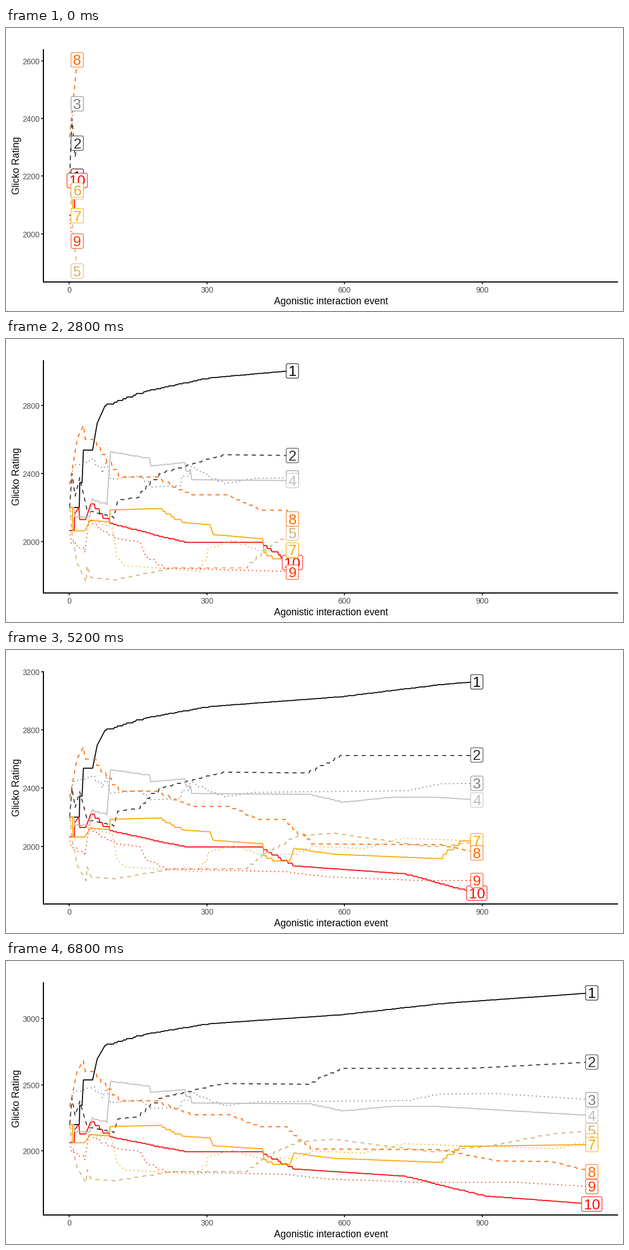
Write a matplotlib script that moves like this. It is 1105x507 px and loops after 7 s.

```python
import math
from itertools import pairwise

import matplotlib.pyplot as plt
import numpy as np
from matplotlib.animation import FuncAnimation
from matplotlib.patches import FancyBboxPatch

W, H, DPI = 1105, 507, 64
PT = 72 / DPI  # points per pixel
FRAMES, INTERVAL = 35, 200

LEFT, RIGHT, TOP, BOTTOM = 67, 1096, 38.2, 454.3
X0, X_SCALE = 113.2, 0.8217
START, STEP, LAST = 17.4, 33.5, 1139
EM = 26
STYLES = {"solid": "-", "dash": (0, (4, 4)), "dot": (0, (1, 3))}

plt.rcParams["font.family"] = "Liberation Sans"
rng = np.random.default_rng(4)
fig = plt.figure(figsize=(W / DPI, H / DPI), dpi=DPI, facecolor="white")
ax = fig.add_axes([0, 0, 1, 1])
ax.set_xlim(0, W)
ax.set_ylim(H, 0)
ax.axis("off")


def px(x):
    return X0 + X_SCALE * x


def stroke(xs, ys, color, width=2.0, **kw):
    return ax.plot(xs, ys, color=color, lw=width * PT, solid_capstyle="butt",
                   dash_capstyle="butt", **kw)[0]


def write(x, y, s, size, color="black", **kw):
    kw = {"ha": "center", "va": "baseline", **kw}
    return ax.text(x, y, s, fontsize=size * PT, color=color, **kw)


def stairs(knots, tread=10, rise=2.5):
    """Join the knots by uneven steps, since a rating only moves when a bout ends."""
    path = [knots[0]]
    for (x0, y0), (x1, y1) in pairwise(knots):
        n = max(1, int((x1 - x0) / tread))
        for i in range(1, n + 1):
            late = rng.uniform(0, 0.6) if i < n else 0
            x = x0 + (x1 - x0) * (i - late) / n
            if n > 1:
                path.append((x - rise, path[-1][1]))
            path.append((x, y0 + (y1 - y0) * i / n))
    return np.array(path, float).T


class Track:
    """One rated individual: a line growing to the right and a boxed label."""

    all = []

    def __init__(self, name, color, style, *knots):
        n = len(Track.all)
        self.x, self.y = stairs(knots)
        self.line = stroke([], [], color, 1.8, ls=STYLES[style], zorder=3 + 0.01 * n)
        self.w, self.h = 7.6 + 0.556 * EM * len(name), 26
        self.box = FancyBboxPatch((0, 0), self.w, self.h, fc="white", ec=color, lw=PT,
                                  boxstyle="round,pad=0,rounding_size=2.8",
                                  zorder=10 + 2 * n)
        ax.add_patch(self.box)
        self.text = write(0, 0, name, EM, color, zorder=11 + 2 * n)
        Track.all.append(self)

    def until(self, tip):
        keep = self.x < tip
        return (np.append(self.x[keep], tip),
                np.append(self.y[keep], np.interp(tip, self.x, self.y)))

    def draw(self, xs, ys):
        self.line.set_data(xs, ys)
        x, y = xs[-1], ys[-1]
        self.box.set_bounds(x - self.w / 2, y - self.h / 2, self.w, self.h)
        self.text.set_position((x, y + 9.3))


# Key (event, rating) points of each individual, in drawing order.
Track("1", "#000000", "solid", (1, 2200), (22, 2200), (23, 2345), (28, 2345), (31, 2537),
      (51, 2537), (61, 2695), (78, 2797), (163, 2880), (305, 2961), (593, 3029),
      (820, 3116), (1139, 3194))
Track("10", "#FF0000", "solid", (1, 2065), (11, 2065), (12, 2163), (21, 2200), (23, 2129),
      (36, 2129), (47, 2221), (89, 2107), (252, 1995), (416, 1995), (488, 1865),
      (732, 1810), (905, 1661), (1139, 1600))
Track("2", "#333333", "dash", (1, 2200), (6, 2400), (13, 2267), (23, 2375), (39, 2185),
      (97, 2138), (106, 2242), (150, 2260), (196, 2398), (335, 2510), (520, 2504),
      (590, 2624), (873, 2624), (1139, 2672))
Track("3", "#7F7F7F", "dot", (1, 2200), (8, 2440), (50, 2485), (72, 2402), (81, 2472),
      (90, 2365), (155, 2385), (175, 2320), (240, 2328), (264, 2440), (337, 2340),
      (404, 2371), (740, 2382), (806, 2430), (925, 2434), (1139, 2388))
Track("4", "#BEBEBE", "solid", (1, 2200), (10, 2200), (12, 2145), (45, 2145), (50, 2250),
      (82, 2215), (90, 2527), (175, 2488), (178, 2443), (246, 2464), (267, 2363),
      (526, 2357), (593, 2302), (702, 2337), (800, 2337), (1139, 2268))
Track("5", "#D2B071", "dash", (1, 2200), (6, 2050), (17.4, 1871), (37, 1762), (39, 1858),
      (48, 1788), (98, 1775), (228, 1845), (386, 1845), (420, 1940), (495, 2068),
      (574, 2090), (790, 1994), (920, 2040), (1049, 2129), (1139, 2154))
Track("6", "#E8AA2E", "dot", (1, 2200), (7, 2115), (17, 2152), (94, 2080), (104, 1912),
      (121, 1858), (282, 1825), (302, 1955), (353, 2005), (410, 1947), (495, 1945),
      (526, 2000), (641, 1985), (727, 2055), (1055, 2018), (1139, 2076))
Track("7", "#FFA500", "solid", (1, 2200), (7, 2200), (8, 2063), (34, 2063), (46, 2125),
      (88, 2113), (89, 2185), (195, 2194), (246, 2113), (307, 2098), (314, 2040),
      (422, 2016), (424, 1935), (444, 1898), (481, 1898), (490, 1985), (574, 1945),
      (809, 1914), (851, 2035), (1139, 2049))
Track("8", "#FF6A00", "dash", (1, 2335), (17.4, 2603.5), (31, 2682), (35, 2600), (53, 2600),
      (108, 2379), (190, 2379), (264, 2274), (350, 2274), (412, 2184), (471, 2184),
      (526, 2016), (808, 2010), (933, 1925), (1049, 1921), (1139, 1845))
Track("9", "#FF3300", "dot", (1, 2065), (5, 1990), (34, 1935), (43, 2125), (100, 2018),
      (155, 1995), (167, 1912), (207, 1845), (471, 1824), (556, 1790), (763, 1764),
      (970, 1764), (1139, 1732))


def breaks(lo, hi, m=5):
    """Axis breaks by the extended Wilkinson rule, kept inside the range."""
    best, ticks, span = -9, [], hi - lo
    for i, q in enumerate((1, 5, 2, 2.5, 4, 3)):
        for step in (10 * q, 100 * q, 1000 * q):
            for k in range(2, 11):
                for a in range(math.floor(hi / step) - k + 1, math.ceil(lo / step) + 1):
                    first, last = a * step, (a + k - 1) * step
                    cover = 1 - 0.5 * ((hi - last) ** 2 + (lo - first) ** 2) / (0.1 * span) ** 2
                    ratio = (k - 1) / (last - first) * (max(last, hi) - min(first, lo)) / (m - 1)
                    dense = 2 - max(ratio, 1 / ratio)
                    score = 0.25 * (1 - i / 5) + 0.2 * cover + 0.5 * dense + 0.05
                    if score > best:
                        best, ticks = score, first + step * np.arange(k)
    return [t for t in ticks if lo <= t <= hi]


stroke([LEFT, LEFT], [38, 456], "black", zorder=2)
stroke([LEFT - 1, RIGHT], [455, 455], "black", zorder=2)
for v in range(0, 901, 300):
    stroke([round(px(v))] * 2, [455, 459], "#333333", zorder=1)
    write(px(v), 473.5, str(v), 13.9, "#4D4D4D")
write(582, 495, "Agonistic interaction event", 17.5)
write(24, 246, "Glicko Rating", 17.5, rotation=90, rotation_mode="anchor")

y_ticks = [(stroke([], [], "#333333", zorder=1),
            write(60.5, 0, "", 13.9, "#4D4D4D", ha="right")) for _ in range(10)]


def draw(frame):
    tip = min(START + STEP * frame, LAST)
    shown = [t.until(tip) for t in Track.all]
    lo = min(y.min() for _, y in shown)
    hi = max(y.max() for _, y in shown)
    pad = 0.05 * (hi - lo)
    lo, hi = lo - pad, hi + pad

    def py(v):
        return BOTTOM - (v - lo) / (hi - lo) * (BOTTOM - TOP)

    for track, (x, y) in zip(Track.all, shown):
        track.draw(px(x), py(y))

    for mark, label in y_ticks:
        mark.set_data([], [])
        label.set_text("")
    for (mark, label), v in zip(y_ticks, breaks(lo, hi)):
        y = py(v)
        mark.set_data([62.5, 66], [round(y)] * 2)
        label.set_text(f"{v:.0f}")
        label.set_y(y + 6)
    return []


anim = FuncAnimation(fig, draw, frames=FRAMES, interval=INTERVAL, init_func=lambda: draw(0),
                     repeat=True, repeat_delay=0, blit=False)
plt.show()
```
